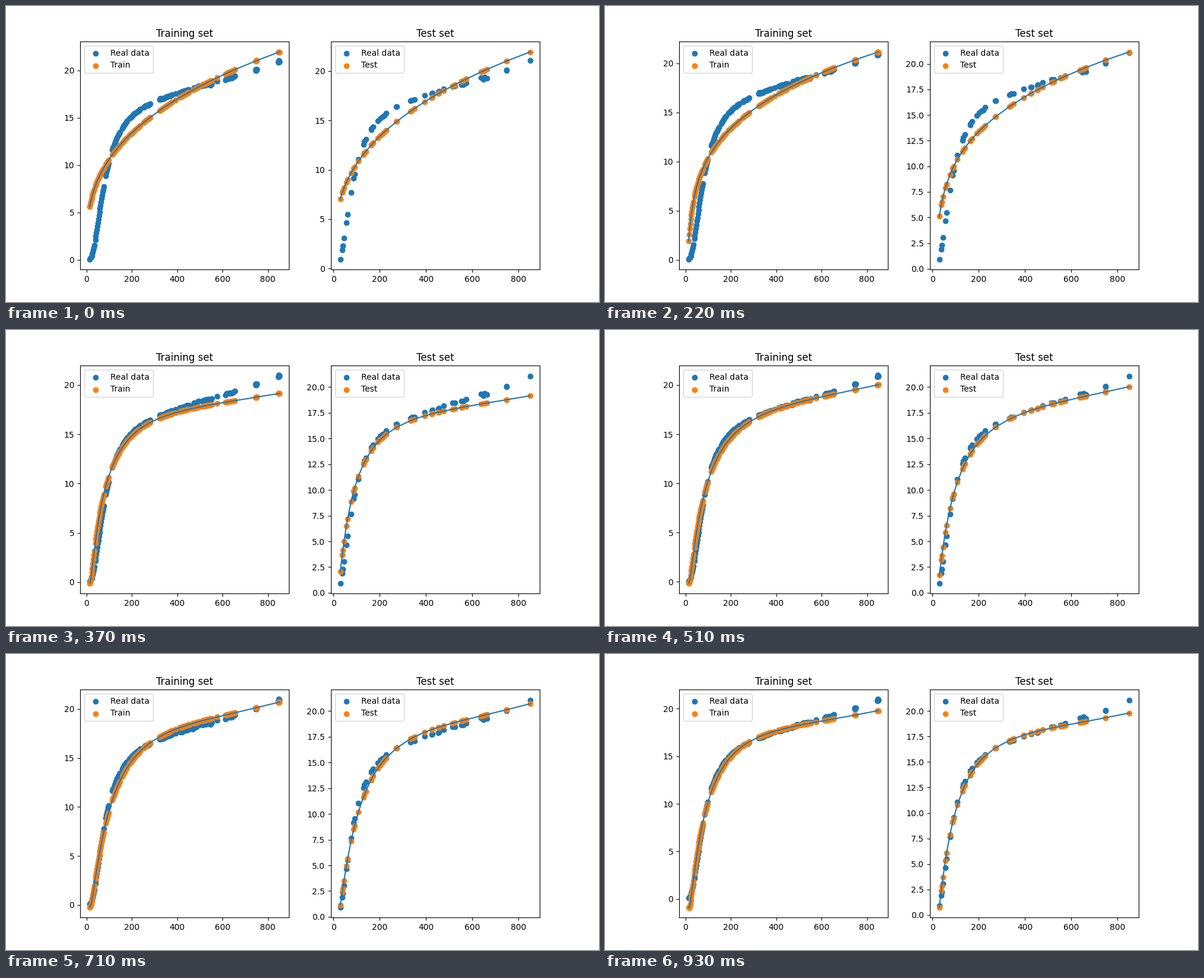
Animation, 1000 px wide and 500 px high, one loop 2.04 s. Source, as a matplotlib script:

```python
import numpy as np
import matplotlib.pyplot as plt
from matplotlib.animation import FuncAnimation

LOOP, TICK = 2040, 10
rng = np.random.default_rng(4)


def expansion(x):
    """Rational model of the thermal expansion of copper (NIST Hahn1)."""
    top = np.polyval([-1.4262662514e-6, 4.086375061e-3, -0.12269296921, 1.0776351733], x)
    low = np.polyval([-1.2314450199e-7, 2.4053735503e-4, -5.7609940901e-3, 1], x)
    return top / low


def measure(temps, first, last):
    """Readings near the model, with known end values."""
    x = np.sort(temps)
    y = expansion(x) + rng.normal(0, 1.1e-4 * x)
    y[0], y[-1] = first, last
    return x, y


# Heating runs: start, stop, readings.
runs = [(14.13, 34.8, 10), (39, 76, 17), (85, 97.2, 6), (114.3, 147.7, 12),
        (157, 180, 9), (190, 237, 17), (251, 282, 11), (321.5, 378, 22),
        (393, 393, 1), (412, 452, 14), (468, 495, 6), (511, 552, 14),
        (576, 576, 1), (613, 656, 11), (747, 750.5, 8), (846, 851.6, 6)]
train = measure(np.concatenate([np.linspace(*r) for r in runs]), 0.08, 20.93)
test = measure([28.93, 37.4, 40, 45, 55, 60.4, 75.3, 87, 91, 107, 128.5, 133.5, 139,
                162, 164, 171, 192, 202, 211, 220, 227, 272, 274, 333, 339, 350, 395,
                424, 428, 452, 456, 477, 516, 524, 554, 560, 574, 639, 647, 653, 664,
                748, 749, 851], 0.943, 21.085)

# Key points of the fitted curve at each stage of learning, smooth in log(x).
knots = [14.13, 28.93, 45, 75.25, 163, 425, 851]
stages = [[5.6, 7.05, 8.15, 9.67, 12.5, 17.32, 21.94],
          [1.9, 4.4, 6.02, 8.05, 11.4, 16.6, 21.47],
          [1.93, 5.11, 7.02, 9.2, 12.47, 17.1, 21.16],
          [-0.1, 2.1, 4.9, 8.9, 13.8, 17.4, 19.15],
          [-0.2, 1.3, 3.55, 7.42, 13.0, 18.2, 21.27],
          [-0.25, 1.1, 3.35, 7.42, 13.5, 18.22, 20.37],
          [-0.87, 0.83, 3.6, 8.0, 13.7, 17.85, 19.8]]
fits = np.polyfit(np.log(knots), np.transpose(stages), 5)

# When each stage is reached, and when the picture changes, in ms.
reached = [0, 120, 220, 370, 610, 770, 930]
changes = np.array([0, 100, 120, 220, 320, 370, 410, 470, 540, 610,
                    710, 770, 830, 880, 930])


def curve(x, time):
    shown = changes[changes <= time][-1]
    coefs = [np.interp(shown, reached, row) for row in fits]
    return np.polyval(coefs, np.log(x))


class Panel:
    def __init__(self, ax, data, title, label):
        self.ax = ax
        self.x, self.y = data
        ax.set_title(title)
        ax.scatter(self.x, self.y, label="Real data")
        self.dots = ax.scatter(self.x, self.y, label=label)
        self.line, = ax.plot(self.x, self.y, color="C0")
        ax.legend(loc="upper left")
        pad = 0.05 * np.ptp(self.x)
        ax.set_xlim(self.x[0] - pad, self.x[-1] + pad)

    def show(self, time):
        fit = curve(self.x, time)
        self.dots.set_offsets(np.column_stack([self.x, fit]))
        self.line.set_ydata(fit)
        low = min(fit[0], self.y[0])
        high = max(fit[-1], self.y[-1])
        pad = 0.05 * (high - low)
        self.ax.set_ylim(low - pad, high + pad)


fig, (left, right) = plt.subplots(1, 2, figsize=(10, 5), dpi=100)
panels = [Panel(left, train, "Training set", "Train"),
          Panel(right, test, "Test set", "Test")]


def draw(frame):
    for panel in panels:
        panel.show(frame * TICK)
    return []


anim = FuncAnimation(fig, draw, frames=LOOP // TICK, interval=TICK,
                     init_func=lambda: draw(0), repeat=True, repeat_delay=0)
plt.show()
```
